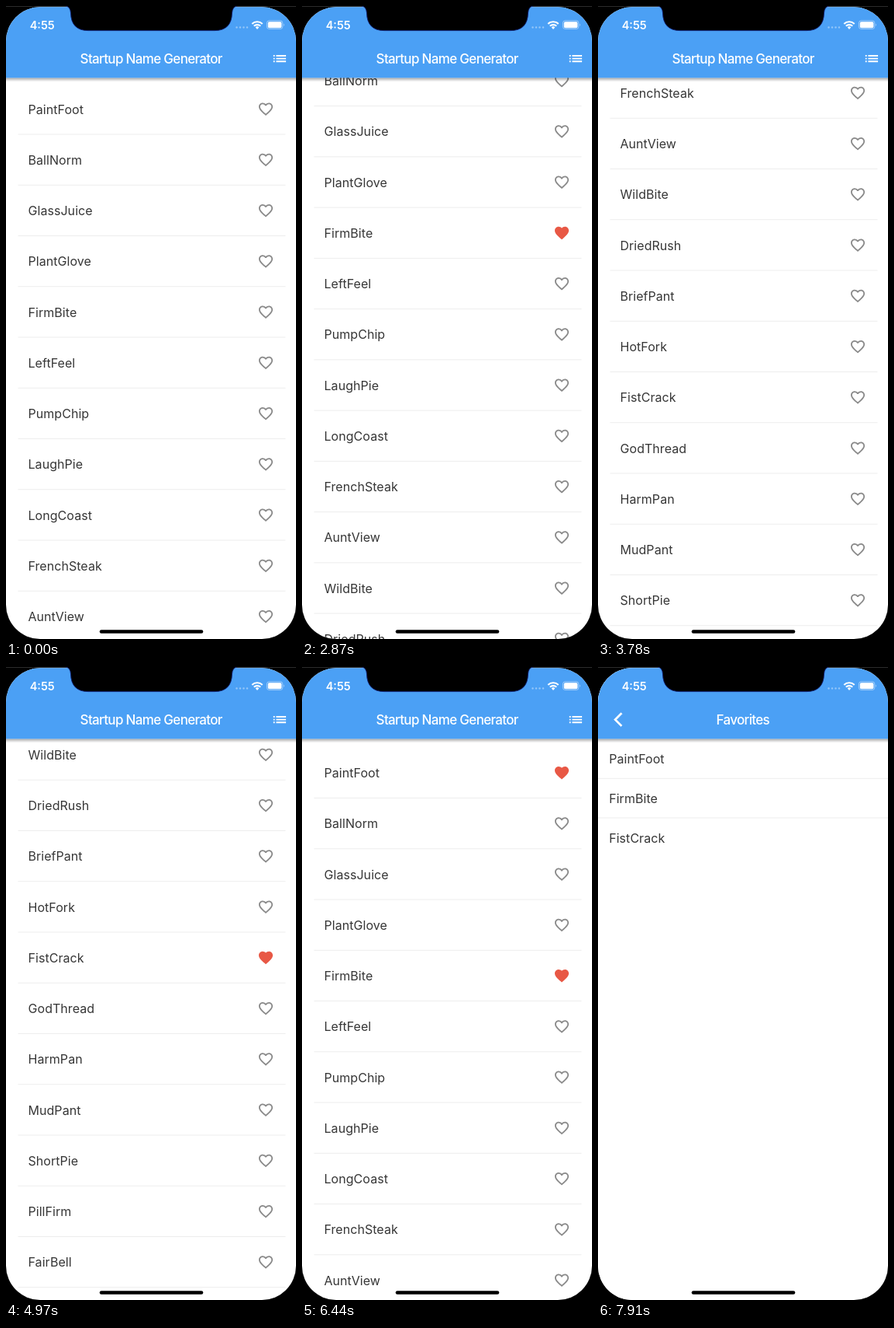
An HTML page that plays this animation: 374 px wide and 814 px high, repeating every 8 s.

```html
<!DOCTYPE html>
<html lang="en">
<head>
<meta charset="utf-8">
<title>Startup Name Generator</title>
<style>
  html, body { margin: 0; width: 100%; height: 100%; overflow: hidden; background: #000; }
  svg { display: block; width: 374px; height: 814px; font-family: Inter, Roboto, sans-serif; }
  .row { font-size: 16px; letter-spacing: .05px; fill: #363636; }
  .title { font-size: 17px; font-weight: 500; letter-spacing: -.68px; fill: #fff; }
  .clock { font-size: 14.5px; font-weight: 600; fill: #fff; }
  .line { fill: #ededed; }
</style>
</head>
<body>
<svg viewBox="0 0 374 814">
  <defs>
    <clipPath id="screen"><rect y="1.3" width="374" height="812.7" rx="44"/></clipPath>
    <linearGradient id="drop" x2="0" y2="1">
      <stop offset="0" stop-opacity=".36"/>
      <stop offset=".5" stop-opacity=".14"/>
      <stop offset="1" stop-opacity="0"/>
    </linearGradient>
    <linearGradient id="edge">
      <stop offset="0" stop-opacity="0"/>
      <stop offset="1" stop-opacity=".12"/>
    </linearGradient>
    <g id="bar">
      <rect y="92.4" width="374" height="5.2" fill="url(#drop)"/>
      <rect width="374" height="92.4" fill="#4ba0f5"/>
    </g>
    <path id="hollow" fill="#8a8a8a" d="M16.5 3c-1.74 0-3.41.81-4.5 2.09C10.91 3.81 9.24 3 7.5 3 4.42 3 2 5.42 2 8.5c0 3.78 3.4 6.86 8.55 11.54L12 21.35l1.45-1.32C18.6 15.36 22 12.28 22 8.5 22 5.42 19.58 3 16.5 3zm-4.4 15.55l-.1.1-.1-.1C7.14 14.24 4 11.39 4 8.5 4 6.5 5.5 5 7.5 5c1.54 0 3.04.99 3.57 2.36h1.87C13.46 5.99 14.96 5 16.5 5c2 0 3.5 1.5 3.5 3.5 0 2.89-3.14 5.74-7.9 10.05z"/>
    <path id="solid" fill="#e85845" d="M12 21.35l-1.45-1.32C5.4 15.36 2 12.28 2 8.5 2 5.42 4.42 3 7.5 3c1.74 0 3.41.81 4.5 2.09C13.09 3.81 14.76 3 16.5 3 19.58 3 22 5.42 22 8.5c0 3.78-3.4 6.86-8.55 11.54z"/>
  </defs>
  <rect width="374" height="814"/>
  <rect width="374" height="1" fill="#2b2b2b"/>
  <g clip-path="url(#screen)">
    <g id="home">
      <rect width="374" height="814" fill="#fff"/>
      <g id="list"></g>
      <use href="#bar"/>
      <text class="title" x="95.6" y="73.8">Startup Name Generator</text>
      <path transform="translate(342.1 56.8) scale(.903)" fill="#fff"
        d="M3 13h2v-2H3zm0 4h2v-2H3zm0-8h2V7H3zm4 4h14v-2H7zm0 4h14v-2H7zM7 7v2h14V7z"/>
    </g>
    <g id="saved">
      <rect x="-18" width="18" height="814" fill="url(#edge)"/>
      <rect width="374" height="814" fill="#fff"/>
      <g id="picks"></g>
      <use href="#bar"/>
      <text class="title" x="152.6" y="73.8">Favorites</text>
      <path transform="translate(20.6 56.8) scale(.903)" fill="#fff" stroke="#fff" stroke-width=".7"
        d="M11.67 3.87L9.9 2.1 0 12l9.9 9.9 1.77-1.77L3.54 12z"/>
    </g>
    <text class="clock" x="30.7" y="29.6">4:55</text>
    <g fill="#fff" opacity=".4">
      <circle cx="297.5" cy="27.5" r="1.2"/><circle cx="302" cy="27.5" r="1.2"/>
      <circle cx="306.5" cy="27.5" r="1.2"/><circle cx="311" cy="27.5" r="1.2"/>
    </g>
    <g fill="none" stroke="#fff" stroke-width="2.1">
      <path d="M317.3 22.9a9.6 9.6 0 0 1 13.4 0M319.8 25.8a6 6 0 0 1 8.4 0"/>
      <path d="M324 30l-2.3-2.5a3.2 3.2 0 0 1 4.6 0z" fill="#fff" stroke="none"/>
    </g>
    <rect x="336.4" y="18.9" width="20.4" height="10.6" rx="3" fill="none" stroke="#fff" stroke-opacity=".5" stroke-width=".9"/>
    <rect x="337.8" y="20.2" width="17.6" height="8" rx="1.8" fill="#fff"/>
    <path d="M358 22.4q1.6 1.8 0 3.6z" fill="#fff" opacity=".6"/>
  </g>
  <path stroke="#101c6e" stroke-width=".9"
    d="M77 0Q83 1 83.5 9Q84 31.6 106 31.6H269Q291 31.6 291.5 9Q292 1 298 0"/>
  <rect x="120.7" y="802.2" width="133.6" height="4.6" rx="2.3"/>
</svg>
<script>
const LOOP = 8000, PITCH = 65.25, WIDTH = 374;
const names = ('PaintFoot BallNorm GlassJuice PlantGlove FirmBite LeftFeel PumpChip LaughPie ' +
  'LongCoast FrenchSteak AuntView WildBite DriedRush BriefPant HotFork FistCrack ' +
  'GodThread HarmPan MudPant ShortPie PillFirm FairBell').split(' ');
const likes = { PaintFoot: 630, FirmBite: 1120, FistCrack: 4550 };

// [time ms, offset px, speed px/s]
const scroll = [
  [2240, 0, 0], [2870, 101.3, 330], [3780, 607.5, 500], [4200, 737.5, 0],
  [5010, 737.5, 0], [5740, 386.3, -850], [6170, 0, -700],
  [6260, -34, 0], [6440, -3.6, 60], [6620, 0, 0]
];
const push = { start: 6760, length: 500 };

const $ = id => document.getElementById(id);

function add(parent, tag, attrs, text) {
  const node = document.createElementNS('http://www.w3.org/2000/svg', tag);
  for (const key in attrs) node.setAttribute(key, attrs[key]);
  if (text) node.textContent = text;
  return parent.appendChild(node);
}

const hearts = names.map((name, i) => {
  const y = 132.5 + i * PITCH;
  add($('list'), 'text', { class: 'row', x: 28.5, y: y + 6.1 }, name);
  add($('list'), 'rect', { class: 'line', x: 15.5, y: y + 32, width: 345, height: 1 });
  return add($('list'), 'use', { transform: `translate(324.2 ${y - 10.8}) scale(.903)` });
});

Object.keys(likes).forEach((name, i) => {
  const y = 118.2 + i * 50.7;
  add($('picks'), 'text', { class: 'row', x: 14.2, y: y + 6.1 }, name);
  if (i < 2) add($('picks'), 'rect', { class: 'line', y: y + 24.6, width: WIDTH, height: 1 });
});

// Cubic Hermite between the scroll points
function offsetAt(t) {
  const k = scroll.findIndex(p => t < p[0]);
  if (k < 1) return 0;
  const [t0, y0, v0] = scroll[k - 1], [t1, y1, v1] = scroll[k];
  const d = (t1 - t0) / 1000, u = (t - t0) / (t1 - t0), w = 1 - u;
  return w * w * ((1 + 2 * u) * y0 + u * d * v0) + u * u * ((3 - 2 * u) * y1 - w * d * v1);
}

function shift(id, x, y) {
  $(id).setAttribute('transform', `translate(${x} ${y})`);
}

function draw() {
  const t = performance.now() % LOOP;
  shift('list', 0, -offsetAt(t));
  hearts.forEach((heart, i) =>
    heart.setAttribute('href', t >= likes[names[i]] ? '#solid' : '#hollow'));

  const p = Math.min(1, Math.max(0, (t - push.start) / push.length));
  const slide = 1 - (1 - p) ** 4;
  shift('home', -slide * WIDTH / 3, 0);
  shift('saved', (1 - slide) * WIDTH, 0);
  $('saved').style.display = p > 0 ? '' : 'none';
  requestAnimationFrame(draw);
}
draw();
</script>
</body>
</html>
```
